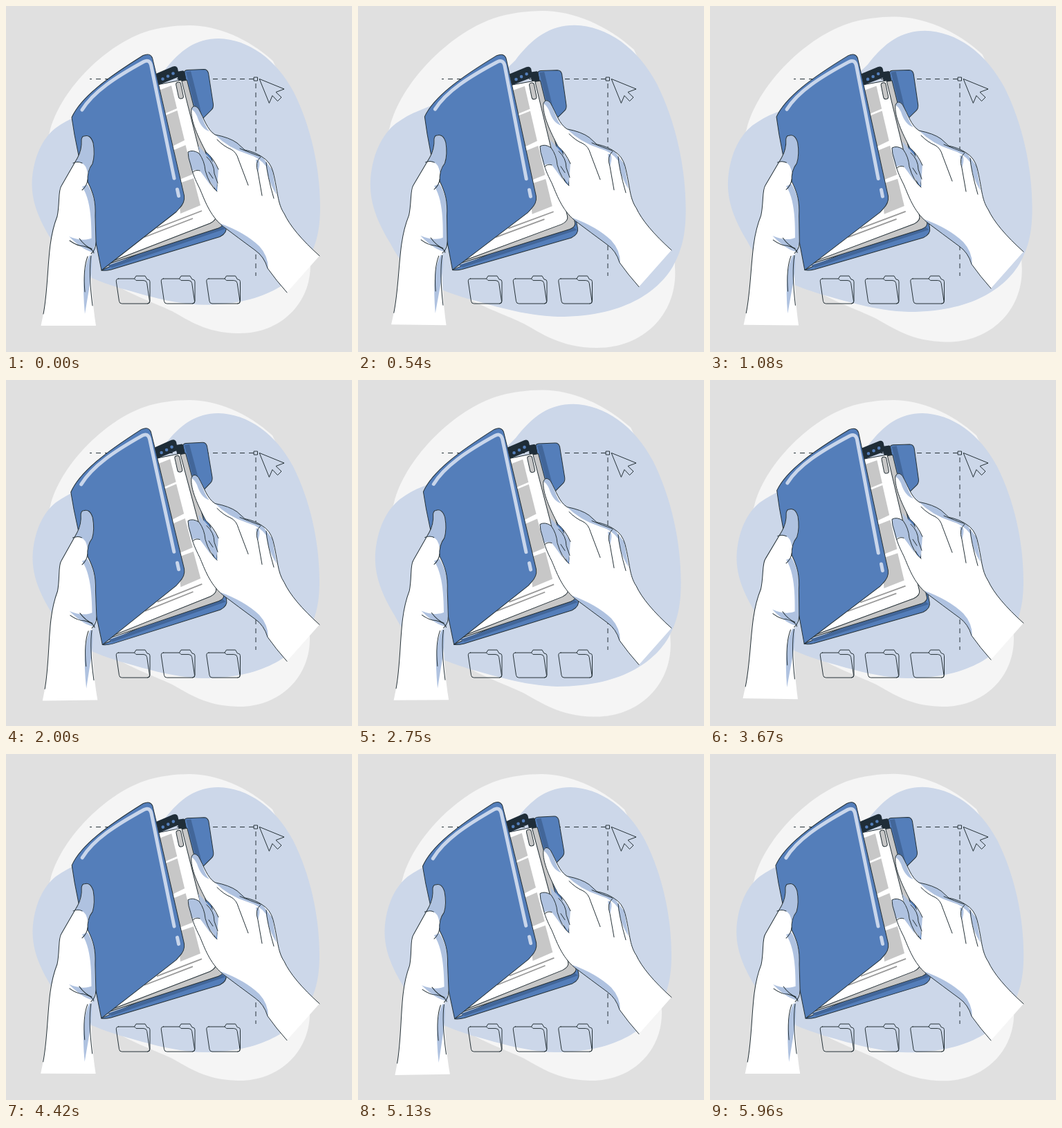
An HTML page that plays this animation: 500 px wide and 500 px high, repeating every 6 s.

```html
<!DOCTYPE html>
<html lang="en">
<head>
<meta charset="utf-8">
<title>Folder in hands</title>
<style>
  html, body { margin: 0; width: 100%; height: 100%; overflow: hidden; background: #e0e0e0; }
  svg { display: block; width: 100%; height: 100%; }
  .ink { fill: none; stroke: #263238; stroke-width: 1; stroke-linecap: round; stroke-linejoin: round; }
  .blue { fill: #547eba; }
  .deep { fill: #426699; }
  .pale { fill: #ccd7e9; }
  .shade { fill: #afc2e0; }
  .white { fill: #fff; }
  .grey { fill: #c7c7c7; }
  .dark { fill: #1f2d38; }
  .shine { fill: none; stroke: #c9d6eb; stroke-width: 5; stroke-linecap: round; stroke-linejoin: round; }
  .text { fill: none; stroke: #999; stroke-width: 1.8; }
</style>
</head>
<body>
<svg viewBox="0 0 500 500">
  <defs>
    <g id="icon" class="ink">
      <path d="M185.5 394.5L188 390.5H201L204 395.5H205Q208 396 208 399V427Q208 430.5 204.5 430.5"/>
      <path d="M162.5 394.5H185.5L188 397H199Q203 397 203.7 401L207.5 427Q207.5 430.5 204.5 430.5H167.5Q164 430.5 163.5 427L159.3 398.5Q159 394.5 162.5 394.5Z"/>
    </g>
  </defs>

  <g id="blobs">
    <path fill="#f5f5f5" d="M265 29C305 29 350 48 385 80C420 150 438 300 439 372C440 430 395 473 335 472C288 471 264 453 240 440C200 420 120 400 90 330C60 270 50 220 64 182C78 125 140 60 200 39C220 32 245 29 265 29Z"/>
    <path class="pale" d="M38.500 255C40 220 53 192 72 177C82 170 92 164 103 160C150 140 195 130 229 94C252 64 275 48 307 48C350 49 390 78 415 125C440 175 453 235 453 290C453 325 447 345 436 365C420 392 380 431 285 431C240 430 195 415 165 407C130 395 90 385 65 335C50 310 38 285 38.500 255Z"/>
  </g>

  <g class="ink">
    <path style="stroke-linecap:butt" stroke-dasharray="7 6" d="M358 105.500H121M361 112V390"/>
    <path class="pale" d="M358.500 103H363.500V108H358.500Z"/>
    <path d="M366.500 105.500L402 120L390 124.500L398 132L392.500 137.500L385 129.500L380.500 140Z"/>
  </g>
  <g transform="translate(0 -.4)">
    <use href="#icon"/><use href="#icon" x="65"/><use href="#icon" x="130.5"/>
  </g>

  <g id="folder">
    <!-- back cover and tab -->
    <path class="ink" style="fill:#547eba" d="M138 382Q144 383 152 381L309 333.500Q320 328 318 319L285 162L297 150Q300 147 299.500 142L292.500 97Q291 91.500 286 91.500L262 92.500Q257 93 258 97L270 160L300 310Z"/>
    <path class="deep" d="M260 95L267 94L284 161L276 158Z"/>
    <path class="deep" d="M147 375L312 318L317 322L153 378Z"/>

    <!-- pages -->
    <path class="dark" d="M246 95L255 93.500Q257.500 93 258 95L261 109L250 111Z"/>
    <path class="ink" style="fill:#c7c7c7" d="M150 372L307 321Q316 317 314 311L261.500 107L224 114Z"/>
    <path class="ink" style="fill:#fff" d="M149 370.500L295 314Q305 309 303 302L253.500 107L218 114Z"/>
    <path class="dark" d="M214 99L241 87.500Q246 85.500 248 90L250.500 102L218 115Z"/>
    <g class="blue"><circle cx="226.500" cy="105.500" r="2.300"/><circle cx="234" cy="101.500" r="2.300"/><circle cx="241.500" cy="97.500" r="2.300"/></g>
    <g class="grey">
      <path d="M218 123L239 115L247 148L226 157Z"/>
      <path d="M228 159L247.500 151L258 194L238 204Z"/>
      <path d="M238 210L259.500 201L270 243L248 252Z"/>
      <path d="M248 257L271 249L281 288L252 300Z"/>
    </g>
    <rect class="ink" style="fill:#c7c7c7" x="247.500" y="110" width="7" height="24" rx="3.300" transform="rotate(-12 251 122)"/>
    <path class="text" d="M218 321L283 296M200 334L270 307"/>

    <!-- front cover -->
    <path class="ink" style="fill:#547eba" d="M95 161C108 132 146 104 198 71.500Q208 67 211.500 75L216 94L257.500 274Q259 284 250 293L246 297.500L138 382L99 186Z"/>
    <path class="shine" d="M110 150C126 124 158 103 199 80.500Q207 76.500 209.500 85L215 112L243 249"/>
    <path class="shine" d="M247.500 265L249.500 274.500"/>

    <!-- left hand -->
    <path class="white" d="M113 188Q122 185 126 198Q129 215 125 228Q117 238 118 254C126 270 130 282 129 304L130 341Q129 353 123 360C122 390 125 430 130 462L50.500 462L54 445C60 415 60 375 64 345Q67 322 74 304C78 285 75 267 80 260L103 220Q110 208 109 193Q110 188 113 188Z"/>
    <path class="shade" d="M113 188Q122 185 126 198Q129 215 125 228Q121 233 118 242Q116 229 109 227Q104 225 100 226L106 215Q110 206 109 193Q110 188 113 188Z"/>
    <path class="shade" d="M110 261L118 258C126 272 130 285 129 304L130 345L124 352C123 330 126 285 110 261Z"/>
    <path class="shade" d="M91 333Q112 342 127 334L128 356Q113 355 91 333ZM121 360Q108 383 114 445L119 415Q125 385 124 362Z"/>
    <path class="ink" d="M54 445C60 415 60 375 64 345Q67 322 74 304C78 285 75 267 80 260L103 220Q110 208 109 193Q110 188 113 188Q122 185 126 198Q129 215 125 228Q117 238 118 254C126 270 130 282 129 304L130 341Q130 352 123 358"/>
    <path class="ink" d="M97 227Q104 224 110 227M118 251Q117 260 110 266M92 339Q103 347 112 347Q125 350 127 357M106 336Q114 347 124 351M123 361Q119 385 125 433M118 362Q111 380 114 413"/>
  </g>

  <g id="hand">
    <path class="shade" d="M278 202Q295 220 307 236L304 266L285 240Z"/>
    <path class="white" d="M268 149Q271 141 278 148C287 164 290 178 302 186Q323 190 334 198L345 208Q360 211 370 218Q382 225 386 240C393 268 392 285 402 300Q414 326 453 361L406 414Q390 396 378 379Q373 362 360 353Q337 336 313 318C294 302 287 280 280 264C273 250 270 243 267 230Q263 219 263 211Q270 207 279 213Q287 224 288 238Q294 259 305 268L307 236Q300 220 289 211C278 190 266 165 268 149Z"/>
    <path class="shade" d="M268 149Q271 141 278 148C285 162 287 174 294 181Q282 178 276 159Q272 151 268 149ZM263 211Q270 207 279 213Q287 224 288 238L296 260Q285 244 280 238Q272 235 269 239Q263 222 263 211Z"/>
    <path class="shade" d="M302 186Q323 190 334 198L345 208Q361 211 372 220L385 237L391 273Q379 254 376 232Q367 219 349 214Q321 205 302 186ZM361 222Q370 221 364 240Z"/>
    <path class="shade" d="M309 314Q345 327 366 347Q379 361 379 380Q373 362 360 353Q337 336 313 318Z"/>
    <path class="ink" d="M453 361Q414 326 402 300C392 285 393 268 386 240Q382 225 370 218Q360 211 345 208L334 198Q323 190 302 186C290 178 287 164 278 148Q271 141 268 149C266 165 278 190 289 211Q300 220 307 236M406 414Q390 396 378 379Q373 362 360 353Q337 336 313 318C294 302 287 280 280 264C273 250 270 243 267 230Q263 219 263 211Q270 207 279 213Q287 224 288 238Q294 259 305 268"/>
    <path class="ink" d="M305 193Q315 203 325 207Q333 211 336 222L350 259M338 206Q355 213 367 217M368 218Q359 226 364 240L370 274M376 226Q377 243 387 278M270 240Q274 236 280 238M290 218Q301 228 301 242L306 256M293 240L299 249"/>
  </g>
</svg>
<script>
  const LOOP = 6000;
  const $ = id => document.getElementById(id);
  const blobs = $('blobs'), folder = $('folder'), hand = $('hand');

  const wave = x => (1 - Math.cos(Math.PI * x)) / 2;
  const square = x => x * x;

  // Two swells, then rest: [start, end, from, to, easing]
  const swells = [
    [-80, 500, 0, 1, wave],
    [500, 1850, 1, 0, wave],
    [2194, 2880, 0, 1, square],
    [2880, 3630, 1, 0, wave],
  ];

  function swell(t) {
    if (t > LOOP - 80) t -= LOOP;
    for (const [start, end, from, to, ease] of swells)
      if (t >= start && t < end) return from + (to - from) * ease((t - start) / (end - start));
    return 0;
  }

  // Linear sway: 0 to 1 to -1 and back to 0
  function sway(t) {
    const p = t % 3000 / 750;
    return p < 1 ? p : p < 3 ? 2 - p : p - 4;
  }

  function draw(now) {
    const t = now % LOOP;
    const scale = 1 + 0.1 * swell(t);
    blobs.setAttribute('transform', `translate(245.7 250.5) scale(${scale}) translate(-245.7 -250.5)`);
    folder.setAttribute('transform', `rotate(${sway(t)} 184 266)`);
    hand.setAttribute('transform', `translate(0 ${-10 * wave(t / 750)})`);
  }

  const begin = performance.now();
  function frame() {
    draw(performance.now() - begin);
    requestAnimationFrame(frame);
  }
  frame();
</script>
</body>
</html>
```
